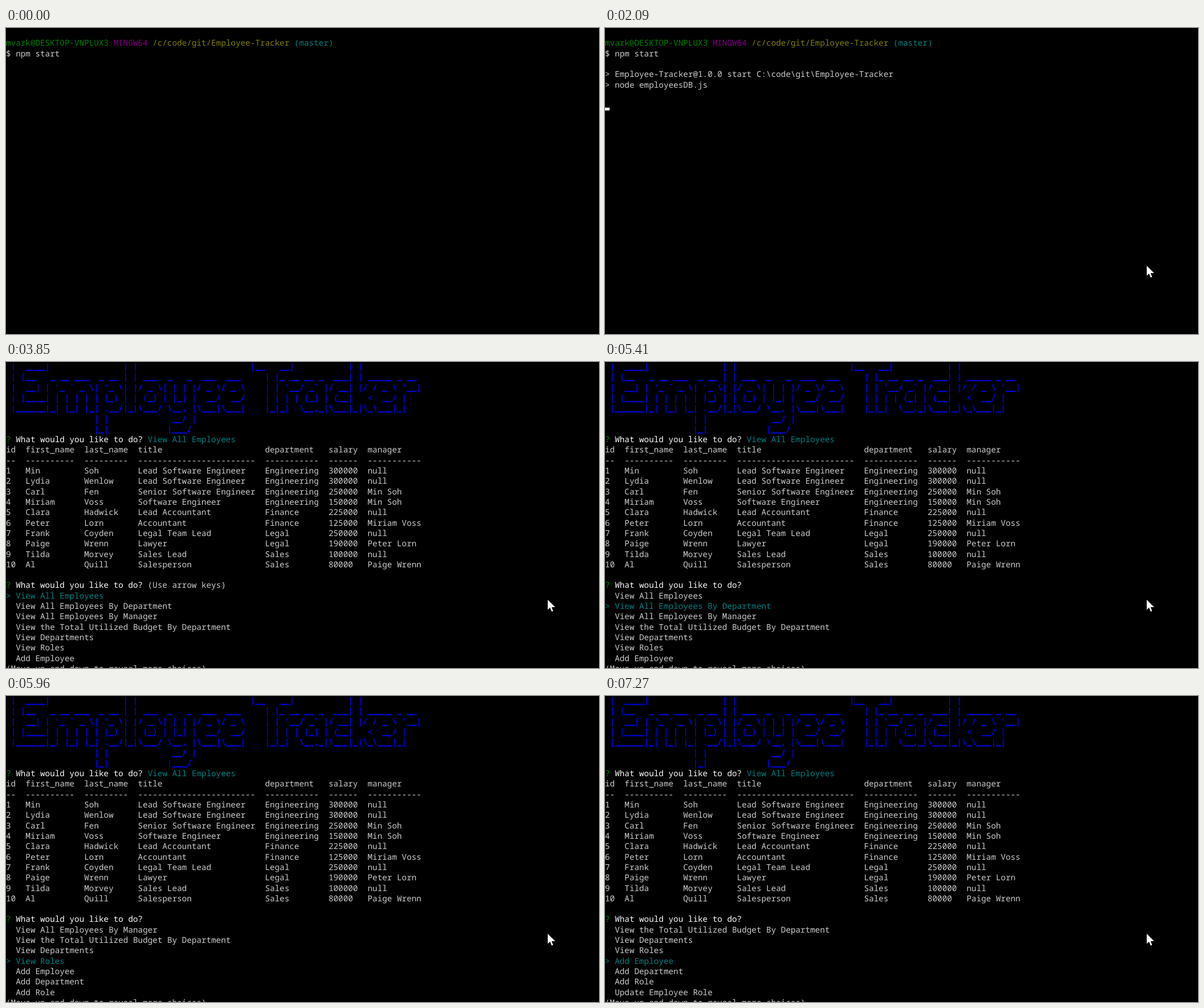
An HTML page for the animation above (8 s loop, 1041 by 538 pixels).

```html
<!DOCTYPE html>
<html lang="en">
<head>
<meta charset="utf-8">
<title>Employee Tracker terminal</title>
<style>
  html, body { margin: 0; width: 100%; height: 100%; overflow: hidden; background: #000; }
  svg { display: block; width: 1041px; height: 538px; background: #000; }
  text {
    font: 14.3px "Noto Sans Mono", "DejaVu Sans Mono", monospace;
    font-variant-ligatures: none;
    white-space: pre;
    text-rendering: geometricPrecision;
  }
</style>
</head>
<body>
<svg viewBox="0 0 1041 538">
  <g id="screen"></g>
  <rect id="caret" width="8" height="5" fill="#fff"/>
  <path id="mouse" d="M0 0V17.5L4 13.8 7 20.8 9.4 19.8 6.8 13H13Z" fill="#fff"/>
</svg>

<script type="text/plain" id="banner">
  ______                 _                         _______             _
 |  ____|               | |                       |__   __|           | |
 | |__   _ __ ___  _ __ | | ___  _   _  ___  ___     | |_ __ __ _  ___| | _____ _ __
 |  __| | '_ ` _ \| '_ \| |/ _ \| | | |/ _ \/ _ \    | | '__/ _` |/ __| |/ / _ \ '__|
 | |____| | | | | | |_) | | (_) | |_| |  __/  __/    | | | | (_| | (__|   <  __/ |
 |______|_| |_| |_| .__/|_|\___/ \__, |\___|\___|    |_|_|  \__,_|\___|_|\_\___|_|
                  | |             __/ |
                  |_|            |___/
</script>

<script>
const LOOP = 8000, CELL = 8.58, LINE = 18.31, PAGE = 7;
const byId = id => document.getElementById(id);
const screen = byId('screen'), caret = byId('caret'), mouse = byId('mouse');

const escapeText = s => s.replace(/&/g, '&amp;').replace(/</g, '&lt;').replace(/>/g, '&gt;');
const ink = (color, outline = 0) => s =>
  `<tspan fill="${color}"${outline ? ` stroke="${color}" stroke-width="${outline}"` : ''}>${escapeText(s)}</tspan>`;
const grey = ink('#ccc'), white = ink('#fff'), blue = ink('#00f', 0.45), green = ink('#008000'),
      purple = ink('#800080'), olive = ink('#808000'), teal = ink('#008080');

const banner = byId('banner').textContent.split('\n').slice(1, 9).map(s => blue(s));

const shell = [
  '',
  green('mvark@DESKTOP-VNPLUX3 ') + purple('MINGW64 ') +
    olive('/c/code/git/Employee-Tracker ') + teal('(master)'),
  grey('$ npm start'),
  ''
];
const launch = [
  ...shell,
  grey('> Employee-Tracker@1.0.0 start C:\\code\\git\\Employee-Tracker'),
  grey('> node employeesDB.js'),
  ''
];

const records = `id|first_name|last_name|title|department|salary|manager
1|Min|Soh|Lead Software Engineer|Engineering|300000|null
2|Lydia|Wenlow|Lead Software Engineer|Engineering|300000|null
3|Carl|Fen|Senior Software Engineer|Engineering|250000|Min Soh
4|Miriam|Voss|Software Engineer|Engineering|150000|Min Soh
5|Clara|Hadwick|Lead Accountant|Finance|225000|null
6|Peter|Lorn|Accountant|Finance|125000|Miriam Voss
7|Frank|Coyden|Legal Team Lead|Legal|250000|null
8|Paige|Wrenn|Lawyer|Legal|190000|Peter Lorn
9|Tilda|Morvey|Sales Lead|Sales|100000|null
10|Al|Quill|Salesperson|Sales|80000|Paige Wrenn`.split('\n').map(r => r.split('|'));

function tableLines() {
  const widths = records[0].map((_, i) => Math.max(...records.map(r => r[i].length)));
  const format = cells => grey(cells.map((c, i) => c.padEnd(widths[i])).join('  '));
  const [head, ...body] = records;
  return [head, widths.map(w => '-'.repeat(w)), ...body].map(format);
}

const choices = [
  'View All Employees', 'View All Employees By Department', 'View All Employees By Manager',
  'View the Total Utilized Budget By Department', 'View Departments', 'View Roles',
  'Add Employee', 'Add Department', 'Add Role', 'Update Employee Role', 'Update Employee Manager'
];
const question = green('? ') + white('What would you like to do? ');

// The selection moves down to the middle of the page, then the list scrolls.
function menu(active, hint = '') {
  const start = Math.max(0, active - 3);
  const items = choices.slice(start, start + PAGE).map((name, i) =>
    start + i === active ? teal('> ' + name) : grey('  ' + name));
  return [question + grey(hint), ...items, grey('(Move up and down to reveal more choices)')];
}

const arrowHint = '(Use arrow keys)';
const welcome = [...launch, ...banner, ...menu(0, arrowHint)];
const results = [...banner.slice(1), question + teal(choices[0]), ...tableLines(), ''];
const listing = (...args) => [...results, ...menu(...args)];

// Each step: [start time, value]
const screens = [
  [0, shell], [2090, launch], [2630, welcome], [3850, listing(0, arrowHint)],
  [5410, listing(1)], [5560, listing(2)], [5710, listing(3)],
  [5790, results], [5880, listing(4)], [5960, listing(5)],
  [6130, listing(6)], [6200, results], [6280, listing(7)], [7270, listing(6)]
];
const carets = [
  [0, null], [930, [11, 2]], [1000, [0, 3]], [1380, null],
  [1940, [0, 3]], [2090, [0, 7]], [2630, null]
];
const pointers = [
  [0, null], [70, [940, 454]], [150, [941, 428]], [220, [941, 414]],
  [390, [933, 405]], [460, [926, 399]], [540, [951, 418]]
];
const valueAt = (steps, t) => steps.findLast(([start]) => start <= t)[1];

function place(node, point) {
  node.setAttribute('visibility', point ? 'visible' : 'hidden');
  if (point) node.setAttribute('transform', `translate(${point})`);
}

let shown;
function render(t) {
  const lines = valueAt(screens, t);
  if (lines !== shown) {
    screen.innerHTML = lines.map((line, row) =>
      `<text x="0" y="${Math.round(row * LINE + 12.95)}">${line}</text>`).join('');
    shown = lines;
  }
  const cell = valueAt(carets, t);
  place(caret, cell && [Math.round(cell[0] * CELL), Math.round(cell[1] * LINE + 11.9)]);
  place(mouse, valueAt(pointers, t));
}

const begin = performance.now();
function tick() {
  render((performance.now() - begin) % LOOP);
  requestAnimationFrame(tick);
}
tick();
</script>
</body>
</html>
```
